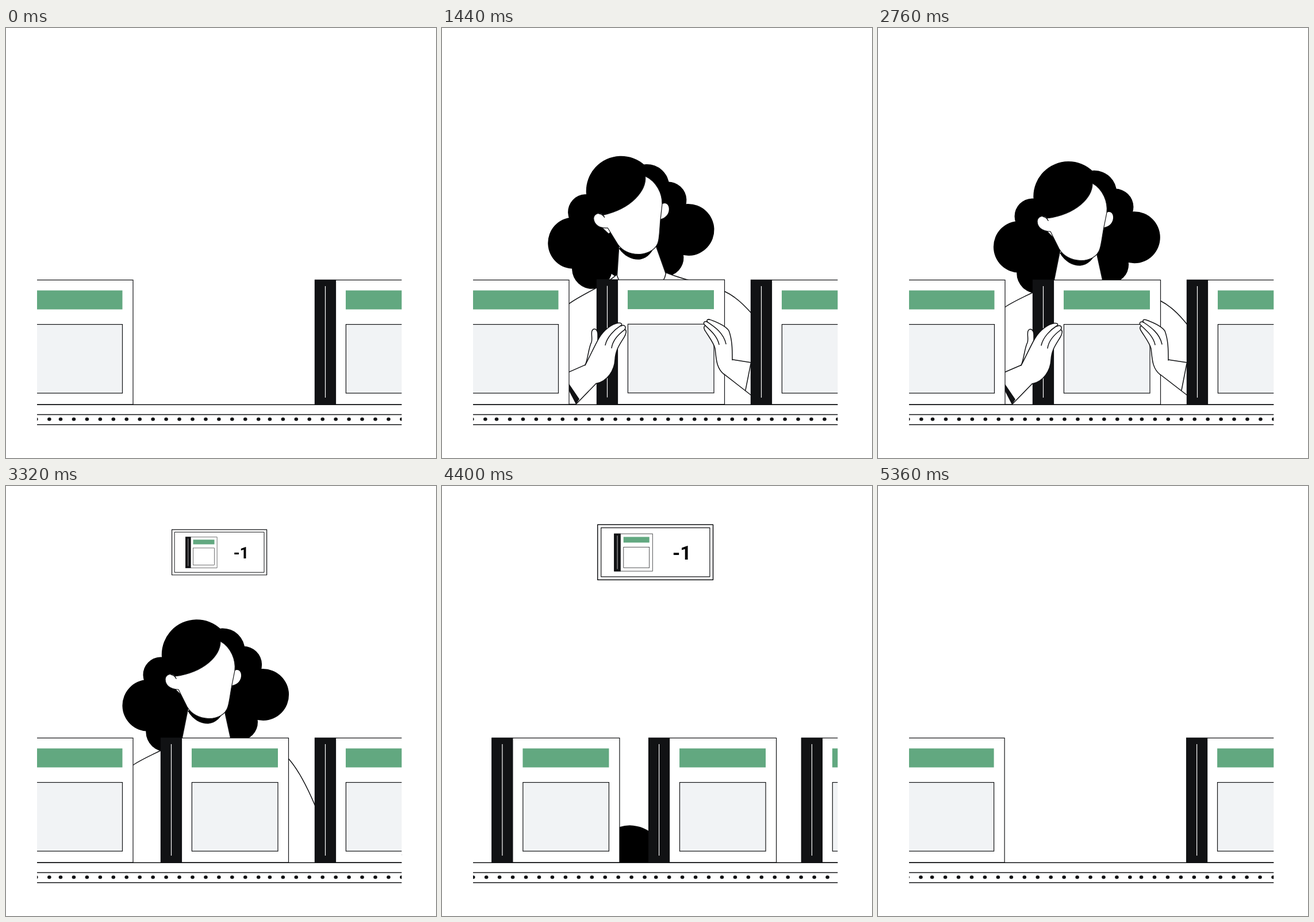
An HTML page for the animation above (5.4 s loop, 748x748 px).

```html
<!DOCTYPE html>
<html lang="en">
<head>
<meta charset="utf-8">
<title>Book on a conveyor</title>
<style>
  html, body { margin: 0; width: 100%; height: 100%; overflow: hidden; background: #fff; }
  svg { display: block; width: 100vw; height: 100vh; }
  .line { fill: #fff; stroke: #111214; stroke-width: 1.5; stroke-linejoin: round; stroke-linecap: round; }
  .bare { fill: none; }
  .thin { stroke-width: 1.2; }
  .ink { fill: #111214; }
  .label { font: 700 34px Roboto, sans-serif; }
</style>
</head>
<body>
<svg viewBox="0 0 748 748">
  <defs>
    <clipPath id="stage"><rect x="54" width="634.3" height="690"/></clipPath>
    <clipPath id="track"><rect x="54" y="650" width="634.3" height="45"/></clipPath>
  </defs>

  <g clip-path="url(#stage)">
    <g id="woman">
      <g class="head"><g id="hair"></g></g>
      <path id="shirt" class="line"/>
      <path id="neck" class="line"/>
      <g class="head">
        <path d="M316 391C326 408 340 414 352 413.5C366 412 374 402 380 390L352 380Z"/>
        <path fill="#fff" d="M397 322C403 317 410 322 409 331C408 341 400 346 392 347Z"/>
        <path class="line thin" d="M373 270C392 281 400 303 398 321L393 346C390 362 389 374 386 384C382 398 367 405 352 404.5C335 404 322 396 315 384L300 354C285 354 277 346 277 336C278 326 291 325 294 331C345 324 373 295 373 270Z"/>
        <path class="line bare" d="M287 328Q293 329 296 335"/>
      </g>
    </g>

    <g id="midBook" class="book"></g>

    <g id="leftHand">
      <path id="leftArm" class="line"/>
      <path id="leftCuff" class="ink"/>
      <g class="grip">
        <path class="line" d="M249 587C254 576 255 556 260 547C262 541 259 532 261 527C264 521 271 524 271 534L271 545L262 570Z"/>
        <path class="line" d="M249 587C258 570 266 552 273 540C282 525 296 515 307 513.5C313 513 314 516 311 519C317 516 321 519 318 525C322 526 320 533 317 538C309 551 302 560 301 577C300 596 288 615 268 619"/>
        <path class="line bare" d="M311 518C300 525 287 538 284 552M318 525C307 533 297 543 295 557"/>
      </g>
    </g>

    <g id="rightHand">
      <path id="rightArm" class="line"/>
      <path id="rightCuff" class="line bare"/>
      <g class="grip">
        <path class="line" d="M505 578C505 560 505 543 499 527C493 518 478 512 467 508C462 506 459 509 462 512C456 509 453 514 458 518C454 520 456 525 459 529C466 540 473 549 475 558C477 572 476 592 491 603"/>
        <path class="line bare" d="M462 512C474 520 490 531 494 550M458 518C468 527 479 537 482 551"/>
      </g>
    </g>

    <g class="side book"></g>
    <g class="side book"></g>
    <g class="side book"></g>
  </g>

  <g clip-path="url(#track)">
    <rect x="54" y="655" width="634.3" height="35" fill="#fff"/>
    <g id="rollers" class="ink"></g>
    <path class="line bare" d="M50 655.2H700M50 672.5H700M50 690H700"/>
  </g>

  <g id="sign">
    <rect class="line" x="270.7" y="67.3" width="200.8" height="96"/>
    <rect class="line thin" x="276.7" y="72.6" width="189.2" height="85.2"/>
    <g id="icon" transform="translate(299.5 83) scale(.3)"></g>
    <text class="label" x="401" y="128">-1</text>
  </g>
</svg>
<script>
const LOOP = 5400, START = 4000, TRAVEL = 538.5;
const all = css => [...document.querySelectorAll(css)];
const $ = id => document.getElementById(id);
const move = (el, x, y) => el.setAttribute('transform', `translate(${x} ${y})`);
const spin = (el, deg, x, y) => el.setAttribute('transform', `rotate(${deg} ${x} ${y})`);
const path = (id, d) => $(id).setAttribute('d', d);

// Progress from 0 to 1 between two times, and easings of it.
const ramp = (t, a, b) => Math.min(1, Math.max(0, (t - a) / (b - a)));
const smooth = (t, a, b) => (1 - Math.cos(Math.PI * ramp(t, a, b))) / 2;
const easeOut = (t, a, b) => 1 - (1 - ramp(t, a, b)) ** 3;
const easeBack = (t, a, b, s) => {
  const q = ramp(t, a, b) - 1;
  return 1 + (s + 1) * q ** 3 + s * q * q;
};

const bodyY = t => 458 - 490 * easeOut(t, 0, 600) + 32 * smooth(t, 520, 2060) + 480 * smooth(t, START, 4600);
const tilt = t => 6.3 * (smooth(t, 1960, 2760) - smooth(t, 200, 1960));
const sway = t => 2.25 - 4.25 * Math.cos((t - 840) / 2240 * 2 * Math.PI);
const lift = t => 320 * (1 - easeOut(t, 0, 1720)) - 1.8 * (1 - smooth(t, 1960, 2760));
const release = t => smooth(t, 2860, 3340);
const pop = t => easeBack(t, 3080, 3900, 1.2) - ramp(t, 4420, 4700) ** 2;
const belt = t => {
  const p = ramp(t, START, LOOP);
  return TRAVEL * (p < .5 ? 2 * p * p : 1 - 2 * (1 - p) ** 2);
};

function book(el, line, pane) {
  el.innerHTML = `<g stroke="#111214" stroke-width="${line}">
    <rect x=".5" y=".4" width="222" height="216.6" fill="#fff"/>
    <rect x=".5" y=".4" width="36" height="216.6" fill="#111214"/>
    <rect x="54.4" y="77.6" width="149.6" height="119.6" fill="${pane}"/></g>
    <rect x="54" y="18.5" width="150" height="33" fill="#62a880"/>
    <path d="M18.5 11V205" stroke="#fff" stroke-width="${line}"/>`;
}

function turn([x, y], deg, cx, cy) {
  const a = deg * Math.PI / 180, c = Math.cos(a), s = Math.sin(a);
  return [cx + (x - cx) * c - (y - cy) * s, cy + (x - cx) * s + (y - cy) * c];
}

// Curls around the head: centre and radius; the last one fills the nape.
const curls = [[331, 293, 61], [376, 287, 39], [412, 312, 32], [445, 365, 45], [403, 412, 32],
  [275, 426, 35], [245, 380, 45], [268, 327, 31], [340, 400, 48]];
$('hair').innerHTML = `<polygon points="${curls.map(([x, y]) => [x, y]).join(' ')}"/>` +
  curls.map(([x, y, r]) => `<circle cx="${x}" cy="${y}" r="${r}"/>`).join('');

// Rollers come in sets of 16 with a slightly narrower gap between sets.
for (let i = -16; i < 48; i++) {
  const x = 95 + 22.95 * i - 3.3 * Math.floor(i / 16);
  $('rollers').innerHTML += `<ellipse cx="${x}" cy="680.4" rx="3.3" ry="3"/>`;
}

all('.book').forEach(el => book(el, 1.2, '#f1f3f5'));
book($('icon'), 2.4, '#fff');
const heads = all('.head'), grips = all('.grip'), sides = all('.side');

function drawWoman(t) {
  const a = tilt(t), b = a * .45, k = release(t);
  move($('woman'), 0, bodyY(t));
  heads.forEach(el => spin(el, a, 350, 490));
  spin($('hair'), sway(t), 345, 250);
  spin($('shirt'), b, 350, 480);
  path('shirt', `M180 760C185 560 195 502 221 485.5C245 469 290 454 308 436
    L391 438C420 452 458 460 492 475Q514 ${486 + 14 * k} 538 ${516 + 41 * k}
    Q565 ${540 + 70 * k} 570 760Z`);
  const [left, right] = [[317, 385], [379, 385]].map(p => turn(p, a, 350, 490));
  const [start, ...collar] = [[306, 440], [316, 480], [382, 480], [391, 440]].map(p => turn(p, b, 350, 480));
  path('neck', `M${left}L${start}C${collar.join(' ')}L${right}`);
}

// The arms bend over the last stretch of the lift and move rigidly before it.
function drawHands(t, h) {
  const k = release(t), n = Math.min(h, 41), u = n / 41;
  const y = h - n + 50 * k * k;
  move($('leftHand'), -115 * k, y);
  move($('rightHand'), 100 * k, y);
  grips.forEach(el => move(el, 0, n));
  path('leftArm', `M268 ${619 + n}L233 ${655 + n}H120V640L221 ${598.5 + n * .34}L250 ${586 + n * .8}`);
  path('leftCuff', `M218 ${615 + n}L239 ${646 + n}L233 ${655 + n}L218 ${626 + n}Z`);
  path('rightArm', `M505 ${577 + n * .75}L538 ${582 + n * .2}L620 ${598 - n * .3}V690L538 639L490 ${602 + n}`);
  path('rightCuff', `M${537 - 13 * u} ${584 + 14 * u}L${528 + 10 * u} ${630 - 6 * u}`);
  [$('leftHand'), $('rightHand')].forEach(el => el.style.display = k < 1 ? '' : 'none');
}

function draw(t) {
  const s = belt(t), h = lift(t), size = pop(t);
  drawWoman(t);
  drawHands(t, h);
  move($('midBook'), 269 + s * 1.0245, 438 + h);
  sides.forEach((el, i) => move(el, -1.5 + s + (i - 1) * TRAVEL, 438));
  move($('rollers'), s && s - TRAVEL, 0);
  $('sign').style.display = size > .01 ? '' : 'none';
  $('sign').setAttribute('transform', `translate(371 115.3) scale(${size}) translate(-371 -115.3)`);
}

let origin;
function tick(now) {
  origin ??= now;
  draw((now - origin) % LOOP);
  requestAnimationFrame(tick);
}
draw(0);
requestAnimationFrame(tick);
</script>
</body>
</html>
```
